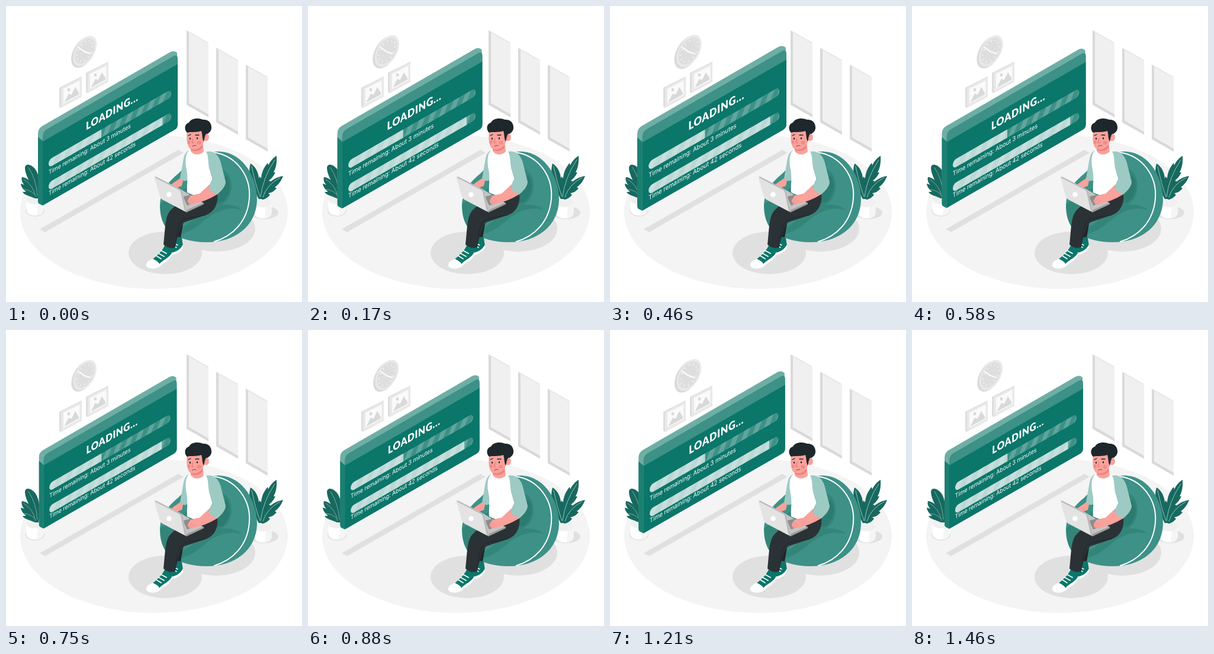
Recreate the animation shown at these times as an HTML page. Size 500 by 500 pixels, loop 1.5 s.

```html
<!DOCTYPE html>
<html lang="en">
<head>
<meta charset="utf-8">
<title>Loading</title>
<style>
  html, body { margin: 0; height: 100%; overflow: hidden; background: #fff; }
  svg { display: block; width: 100vw; height: 100vh; }
  .beat { animation: beat 1.5s linear -45ms infinite; }
  .clock { transform-origin: 131.7px 76.7px; }
  .panel { transform-origin: 172px 206.6px; }
  @keyframes beat {
    0%, 100% { transform: scale(.99); }
    29% { transform: scale(1.089); }
    51% { transform: scale(.99); }
    55.5% { transform: scale(.985); }
    60% { transform: scale(.99); }
    79% { transform: scale(1.089); }
    91% { transform: scale(.99); }
    95.5% { transform: scale(.986); }
  }
  .title { font: 900 18px Lato, sans-serif; letter-spacing: .7px; }
  .note { font: 400 10.3px Inter, sans-serif; }
  .shade { fill: #e0e0e0; }
  .teal { fill: #0b766a; }
  .mid { fill: #3d9187; }
  .skin { fill: #f9a19b; }
  .dark { fill: #2b3236; }
  .sleeve { fill: #9ecac4; }
  .line { fill: none; stroke-linecap: round; stroke-linejoin: round; }
</style>
</head>
<body>
<svg viewBox="0 0 500 500">
  <defs>
    <pattern id="stripes" width="21.5" height="20" patternUnits="userSpaceOnUse" patternTransform="translate(1 0) skewX(-28)">
      <rect width="10.5" height="20" fill="#fff" opacity=".18"/>
    </pattern>
    <g id="track">
      <rect y="-6.7" width="239" height="13.4" rx="6.7" fill="#3d9187"/>
      <rect y="-6.7" width="239" height="13.4" rx="6.7" fill="url(#stripes)"/>
    </g>
    <g id="window">
      <path d="M0 0 37 21V147L0 126Z" fill="#d9d9d9"/>
      <path d="M4 2.3 37 21V142L4 123Z" fill="#f0f0f0"/>
      <path d="M0 0 37 21 34 21 3 3.5Z" fill="#e6e6e6"/>
    </g>
    <g id="picture">
      <path d="M0 19 3 17.4 38 0V34L3 53 0 51.5Z" fill="#dedede"/>
      <path d="M3 19.5 38 1.5V34L3 53Z" fill="#e9e9e9"/>
      <path d="M7 21 34.5 7V31.5L7 46Z" fill="#fafafa"/>
      <path d="M9 42.5 16 29 20.5 31 27 18 33 27.5V30.5L9 43.5Z" fill="#d9d9d9"/>
      <ellipse cx="16" cy="22.5" rx="2.3" ry="2.7" fill="#d9d9d9"/>
    </g>
    <g id="pot">
      <path d="M-14.5 0V18C-14 30 14 30 14.5 18V0Z" fill="#fff"/>
      <path d="M5 6 14.5 0V18C14 23 9 26 3 27Z" fill="#f5f5f5"/>
      <ellipse rx="14.5" ry="8" fill="#f0f0f0"/>
    </g>
  </defs>

  <ellipse cx="250" cy="348" rx="226" ry="130" fill="#f4f4f4"/>
  <g class="shade">
    <path d="M57 377 66 382 300 248 291 243Z"/>
    <ellipse cx="355" cy="376" rx="66" ry="39"/>
    <ellipse cx="269" cy="417" rx="62" ry="36"/>
    <ellipse cx="49" cy="346" rx="16" ry="9.5"/>
    <ellipse cx="436" cy="349" rx="24" ry="11"/>
  </g>

  <use href="#window" x="305" y="41"/>
  <use href="#window" x="355" y="70.5"/>
  <use href="#window" x="405" y="99"/>
  <use href="#picture" x="90" y="119"/>
  <use href="#picture" x="135" y="94"/>

  <g class="beat clock">
    <g transform="matrix(.866 -.5 0 1 130.5 78)"><circle r="23.6" fill="#d9d9d9"/></g>
    <g transform="matrix(.866 -.5 0 1 133.2 76)">
      <circle r="23" fill="#e9e9e9"/>
      <circle r="19.2" fill="#dedede"/>
      <circle r="15.5" class="line" stroke="#fff" stroke-width="3" stroke-dasharray="1.2 6.916" stroke-linecap="butt" style="stroke-linecap:butt"/>
      <path d="M-13 -13 -1 .5 11 10" class="line" stroke="#fff" stroke-width="1.7"/>
    </g>
  </g>

  <!-- left plant -->
  <use href="#pot" x="49" y="327"/>
  <g fill="#17695f">
    <path d="M51 325C47 306 32 288 32 273 33 264 45 268 51 278 58 291 58 311 55 325Z"/>
    <path d="M49 325C41 321 31 320 28 314L34 314C28 309 25 304 25 300L31 302C26 297 26 292 27 289 37 290 48 299 52 325Z"/>
  </g>
  <path d="M38 273Q51 292 53 320M30 293Q46 302 50 322M31 310Q42 311 48 318" class="line" stroke="#8bbbb4" stroke-width=".8"/>

  <g class="beat panel">
    <path d="M54 330V216Q54 207 61 203L277 78Q284 74 289 79L290 200 62 337Z" fill="#6faea5"/>
    <path d="M54 221 62 228V337L56 334Q54 333 54 330Z" fill="#1b7f71"/>
    <path d="M62 229.500V221Q62 212 69 208L283 84.500Q290 81 290 89V98.500Z" class="mid"/>
    <path d="M62 229 290 98V201Q290 206 285 209L69 333 62 337Z" class="teal"/>
    <g fill="#fff">
      <g transform="matrix(.866 -.498 0 1 135 210)"><text class="title">LOADING...</text></g>
      <g transform="matrix(.866 -.498 0 1 72 266.5)">
        <use href="#track"/>
        <path d="M103 -6.700H6.700A6.700 6.700 0 0 0 6.700 6.700H103Z" opacity=".65"/>
      </g>
      <g transform="matrix(.866 -.498 0 1 72 285)"><text class="note">Time remaining: About 3 minutes</text></g>
      <g transform="matrix(.866 -.498 0 1 72 305)">
        <use href="#track"/>
        <path d="M222 -6.700H6.700A6.700 6.700 0 0 0 6.700 6.700H222Z" opacity=".65"/>
      </g>
      <g transform="matrix(.866 -.498 0 1 72 320.500)"><text class="note">Time remaining: About 42 seconds</text></g>
    </g>
  </g>

  <!-- right plant -->
  <use href="#pot" x="434" y="332"/>
  <g fill="#17695f">
    <path d="M428 326C423 311 425 297 428 288L431 291C432 279 437 271 442 265L443 269C447 261 452 256 457 253 458 264 456 274 452 281L455 281C451 290 446 293 444 295L447 296C440 307 435 316 433 326Z"/>
    <path d="M431 326C434 308 446 291 468 287 465 296 459 303 454 306L457 308C452 314 447 316 443 316L446 319C442 324 438 326 434 327Z"/>
    <path d="M427 326C417 307 407 287 413 266 422 271 427 283 427 292L430 291C433 304 433 318 431 326Z"/>
  </g>
  <path d="M454 260Q434 290 430 322M463 290Q440 302 434 323M415 271Q421 300 429 322" class="line" stroke="#a8cbc6" stroke-width=".9"/>

  <!-- beanbag -->
  <path d="M260 340C260 318 268 302 290 284 312 263 335 244 363 246 401 249 425 290 424 329 422 373 385 400 337 399 294 398 261 382 260 340Z" class="mid"/>
  <path d="M361 274C379 277 387 303 376 324 370 335 352 341 335 350 311 362 292 366 274 379 264 368 260 354 261 334L300 310Z" fill="#348579"/>
  <path d="M372 286C381 298 380 316 367 330L350 335 358 304Z" fill="#2c7b70"/>
  <path d="M295 374C320 366 324 343 350 337 378 332 392 338 399 345 374 336 349 350 336 362 323 373 309 383 292 386Z" fill="#348579"/>
  <path d="M349 247C390 252 414 288 411 325 408 365 382 389 352 398" class="line" stroke="#fff" stroke-width="2"/>

  <!-- far leg and shoe -->
  <path d="M315 345 300 362 295 392Q290 396 284 392L286 350Z" fill="#20272b"/>
  <path d="M285 391C291 390 295 390 297 392L299 405C298 411 287 418 280 419L277 411C282 406 284 399 285 391Z" class="teal"/>
  <path d="M299 403V408C296 415 287 420 279 421L278 417C287 416 295 411 299 403Z" fill="#fff"/>
  <path d="M284 401 290 404M282 405 288 408" class="line" stroke="#fff" stroke-width="1.500"/>

  <!-- near leg and shoe -->
  <path d="M269 403 283 407 281 417C277 428 265 430 260 438 253 443 241 443 238 439 237 432 247 430 254 422 262 416 266 409 269 403Z" class="teal"/>
  <path d="M248 427C254 430 259 433 260 438 253 444 240 444 237 439 236 432 242 430 248 427Z" fill="#fff"/>
  <path d="M281 415 281 420C277 430 266 433 260 440 252 445 240 445 237 439 246 442 255 440 259 436 265 428 277 426 281 415Z" fill="#fff"/>
  <path d="M262 413 271 418M258 418 267 423M254 422 262 427" class="line" stroke="#fff" stroke-width="1.800"/>
  <path d="M357 317C359 334 352 348 338 353L302 365C294 370 290 389 285 408Q275 411 266 403C269 379 268 355 278 345 290 332 309 324 322 315Z" class="dark"/>
  <path d="M337 353C318 357 300 357 294 366 288 378 289 393 285 408" class="line" stroke="#1f2529" stroke-width="1"/>

  <!-- far arm -->
  <path d="M301 287 297 304 283 309Q276 305 281 300L294 291Z" class="skin"/>
  <path d="M309 244C299 248 300 262 297 274L294 291Q300 298 307 294L316 262Z" class="sleeve"/>

  <!-- torso -->
  <path d="M311 243C317 240 331 240 337 245 347 248 352 258 353 272L357 318C341 326 320 322 306 315 305 303 308 290 305 276 302 261 303 247 311 243Z" fill="#fff"/>
  <path d="M312 230 332 228 334 246C328 253 316 252 312 245Z" class="skin"/>
  <path d="M312 239C320 243 327 239 332 232L332 239C326 246 319 246 312 243Z" fill="#e9827f"/>

  <!-- laptop -->
  <path d="M264 325 296 310 334 333 304 347Z" fill="#c4c4c4"/>
  <path d="M304 345 334 332V335L304 349Z" fill="#9e9e9e"/>
  <path d="M299 322 311 319 326 329 306 337Z" fill="#8d8d8d"/>
  <path d="M253 288 294 309Q297 311 298 314L305 345Q305 348 302 347L264 327Q261 325 260 322L251 291Q250 287 253 288Z" fill="#e3e3e3"/>
  <path d="M253 288 294 309Q297 311 298 314L305 345 302 347 295 314Q294 311 291 310L252 290Z" fill="#b9b9b9"/>
  <circle cx="275.500" cy="318.500" r="4.300" fill="#fff"/>

  <!-- near arm -->
  <path d="M343 302 362 313C354 322 338 328 329 331L316 335C310 336 306 332 307 328L312 320 327 317Z" class="skin"/>
  <path d="M314 326 307 332M318 328 312 334" class="line" stroke="#e9827f" stroke-width=".8"/>
  <path d="M338 246C352 243 361 253 364 269L371 297C371 305 363 313 357 318 350 316 345 312 342 307L349 292 343 274C341 262 342 252 338 246Z" class="sleeve"/>
  <path d="M349 292 346 281M342 307 349 292" class="line" stroke="#82b5ae" stroke-width=".8"/>

  <!-- head -->
  <path d="M306 211C304 224 306 237 311 241 320 245 331 240 334 229L338 215 329 204 309 205Z" class="skin"/>
  <ellipse cx="338" cy="222" rx="5" ry="6.200" class="skin"/>
  <path d="M334 229C331 224 332 216 330 211 321 214 310 212 306 214 300 208 302 199 309 197 312 190 324 188 333 192 341 191 348 197 347 207 346 213 342 214 341 216 336 214 336 222 334 229Z" fill="#1e272b"/>
  <path d="M339 219Q335 220 336 225" class="line" stroke="#e9827f" stroke-width="1"/>
  <path d="M308 219 312 217M320 218 326 218" class="line" stroke="#1e272b" stroke-width="1.300"/>
  <g fill="#1e272b"><ellipse cx="311" cy="224" rx="1.200" ry="1.700"/><ellipse cx="323" cy="223.500" rx="1.200" ry="1.700"/></g>
  <path d="M316 224 314 231 317 231" class="line" stroke="#e06d6d" stroke-width="1"/>
  <path d="M315 237Q318 234.500 321 236" class="line" stroke="#9b3f43" stroke-width="1.100"/>
  <g fill="#ee7f80" opacity=".65"><ellipse cx="309" cy="230" rx="2.500" ry="3"/><ellipse cx="326" cy="231" rx="3.500" ry="3"/></g>
</svg>
</body>
</html>
```
